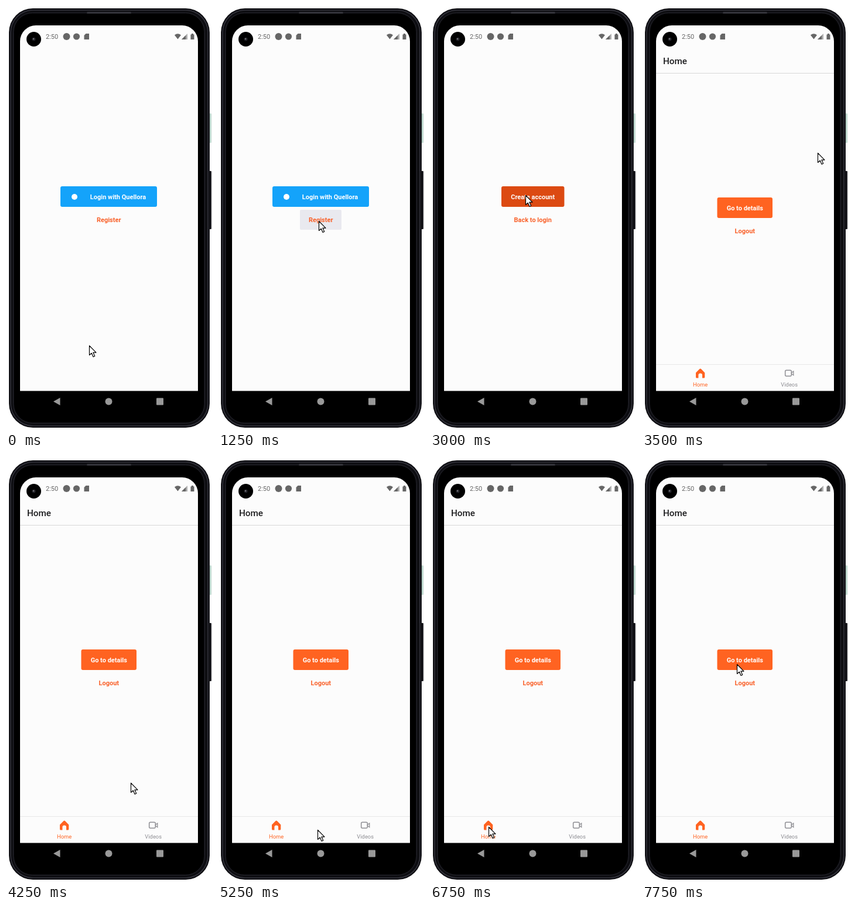
An HTML page for the animation above (8000 ms loop, 352 by 722 pixels).

```html
<!DOCTYPE html>
<html lang="en">
<head>
<meta charset="utf-8">
<title>Tab app demo</title>
<style>
html, body { margin: 0; width: 100%; height: 100%; overflow: hidden; background: #fff; }
svg { display: block; width: 352px; height: 722px; }
text { font-family: Roboto, sans-serif; }
.b { font-size: 11px; font-weight: 700; text-anchor: middle; }
.title { font-size: 15.2px; font-weight: 500; fill: #1c1c1e; }
.tab { font-size: 9.4px; text-anchor: middle; }
.link { fill: #f9612a; }
.light { fill: #fff; }
</style>
</head>
<body>
<svg viewBox="0 0 352 722">
  <g id="phone">
    <rect x="346" y="183" width="5" height="50" rx="1" fill="#bcd6cc"/>
    <rect x="346" y="281" width="5" height="99" rx="1" fill="#17171c"/>
    <rect x="5" y="4" width="343" height="714" rx="41" fill="#0d0d11"/>
    <rect x="8" y="7" width="337" height="708" rx="38" fill="none" stroke="#34343d" stroke-width="1.500"/>
    <rect x="12.500" y="11.500" width="327" height="699" rx="33" fill="none" stroke="#24242b"/>
    <rect x="14" y="13" width="324" height="696" rx="31" fill="#000"/>
    <rect x="138" y="10" width="76" height="3" rx="1.500" fill="#33333a"/>
    <path d="M24 655.500V60a27 27 0 0 1 27-27H301a27 27 0 0 1 27 27V655.500Z" fill="#fcfcfc"/>
    <circle cx="47.500" cy="56.500" r="12.500" fill="#000"/>
    <circle cx="47.500" cy="56.500" r="3" fill="#222228"/>
    <circle cx="47" cy="56" r="1.200" fill="#77777c"/>
    <g fill="#999">
      <path d="M81 673.500L92.500 667V680Z"/>
      <circle cx="175.500" cy="673.500" r="6"/>
      <rect x="257" y="667.500" width="12" height="12" rx="1"/>
    </g>
  </g>

  <g id="status" fill="#666">
    <text x="68" y="56" font-size="11">2:50</text>
    <circle cx="103.500" cy="52" r="6"/>
    <circle cx="120.500" cy="52" r="5.600"/>
    <path d="M136.500 47H142V57H133.500V50Z"/>
    <path d="M288 49.500Q293.500 45 299 49.500L293.500 56.500Z"/>
    <path d="M310 47V57H300Z" fill="#aaa"/>
    <path d="M307 50V57H300Z"/>
    <path d="M315.500 48.500H317V47H320V48.500H321.500V57H315.500Z"/>
  </g>

  <g id="login">
    <rect x="93" y="307" width="165" height="35" rx="3" fill="#14a3fa"/>
    <circle cx="117" cy="325" r="5" fill="#fff"/>
    <text class="b light" x="191.500" y="329">Login with Quellora</text>
    <rect id="glow" x="140" y="347" width="71" height="34" rx="2" fill="#e9e9ef"/>
    <text id="reg" class="b link" x="175.700" y="368">Register</text>
  </g>

  <g id="register">
    <rect id="create" x="122" y="307" width="107.500" height="35" rx="3"/>
    <text class="b light" x="175.700" y="329">Create account</text>
    <text class="b link" x="175.700" y="368">Back to login</text>
  </g>

  <g id="app">
    <text id="title" class="title" x="36" y="99"></text>
    <path d="M24 114.500H328" stroke="#d8d8d8"/>
    <path d="M24 610.500H328" stroke="#e8e8e8"/>
    <g id="tabHome">
      <path d="M92 624.500L98.200 618.200Q99.700 617 101.200 618.200L107.300 624.500V632Q107.300 633.500 105.800 633.500H103V628.500Q103 625.500 99.700 625.500T96.400 628.500V633.500H93.500Q92 633.500 92 632Z"/>
      <path d="M98.300 633.500V628.500Q98.300 627.300 99.700 627.300T101.100 628.500V633.500Z" fill="#fcfcfc"/>
      <text class="tab" x="99.600" y="647.500">Home</text>
    </g>
    <g id="tabVideos">
      <rect x="244.700" y="620.300" width="10.600" height="10" rx="2" fill="none" stroke="currentColor" stroke-width="1.500"/>
      <path d="M255.500 624.500L258.800 622V628.700L255.500 626.200Z" fill="none" stroke="currentColor" stroke-width="1.300"/>
      <text class="tab" x="251.700" y="647.500">Videos</text>
    </g>
    <g id="home">
      <rect x="128.500" y="326" width="94.500" height="35" rx="3" fill="#ff6321"/>
      <text class="b light" x="175.800" y="348">Go to details</text>
      <text class="b link" x="175.800" y="387">Logout</text>
    </g>
    <text id="videos" x="175.700" y="373.500" font-size="27.500" text-anchor="middle" fill="#1c1c1e">Videos</text>
  </g>

  <path id="cursor" d="M.5 .5V16.500L4.200 13.100L7.100 19.500L9.700 18.300L6.900 12.100H12Z" fill="#fff" stroke="#000" stroke-width="1.200" stroke-linejoin="round"/>
</svg>
<script>
const LOOP = 8000, TICK = 250;
const ORANGE = '#ff6321', PRESSED = '#dc4a12', IDLE = '#8e8e93';
const el = id => document.getElementById(id);

// time, x, y of the pointer tip
const path = [
  [0, 142, 578], [250, 142, 578], [1000, 172, 366], [1750, 172, 366],
  [2250, 141, 329], [3000, 163, 322], [3250, 163, 322], [3500, 300, 250],
  [3750, 206, 341], [4000, 206, 345], [4250, 213, 553], [4500, 258, 628],
  [4750, 160, 634], [5000, 82, 632], [5250, 170, 633], [5500, 250, 632],
  [5750, 250, 632], [6250, 121, 629], [6500, 100, 628], [6750, 100, 628],
  [7250, 150, 420], [7500, 162, 351], [8000, 162, 351]
];
const screens = [[0, 'login'], [1500, 'register'], [3250, 'home'], [5750, 'videos'], [6750, 'home']];

const show = (id, on) => el(id).setAttribute('display', on ? 'inline' : 'none');
const fill = (id, color) => el(id).setAttribute('fill', color);

function pointer(t) {
  const i = path.findIndex(p => p[0] > t);
  const [t0, x0, y0] = path[i - 1], [t1, x1, y1] = path[i];
  const k = (t - t0) / (t1 - t0);
  return [x0 + (x1 - x0) * k, y0 + (y1 - y0) * k];
}

function paintTab(id, active) {
  const color = active ? ORANGE : IDLE;
  fill(id, color);
  el(id).style.color = color;
}

function render(ms) {
  const t = Math.floor(ms % LOOP / TICK) * TICK;
  const screen = screens.filter(s => s[0] <= t).pop()[1];
  for (const id of ['login', 'register', 'home', 'videos']) show(id, id === screen);

  const inApp = screen === 'home' || screen === 'videos';
  show('app', inApp);
  if (inApp) {
    el('title').textContent = screen === 'home' ? 'Home' : 'Videos';
    paintTab('tabHome', screen === 'home');
    paintTab('tabVideos', screen === 'videos');
  }

  show('glow', t >= 1250 && t < 1500);
  fill('create', t >= 3000 ? PRESSED : ORANGE);

  el('cursor').setAttribute('transform', `translate(${pointer(t)})`);
}

const start = performance.now();
function frame() {
  render(performance.now() - start);
  requestAnimationFrame(frame);
}
frame();
</script>
</body>
</html>
```
